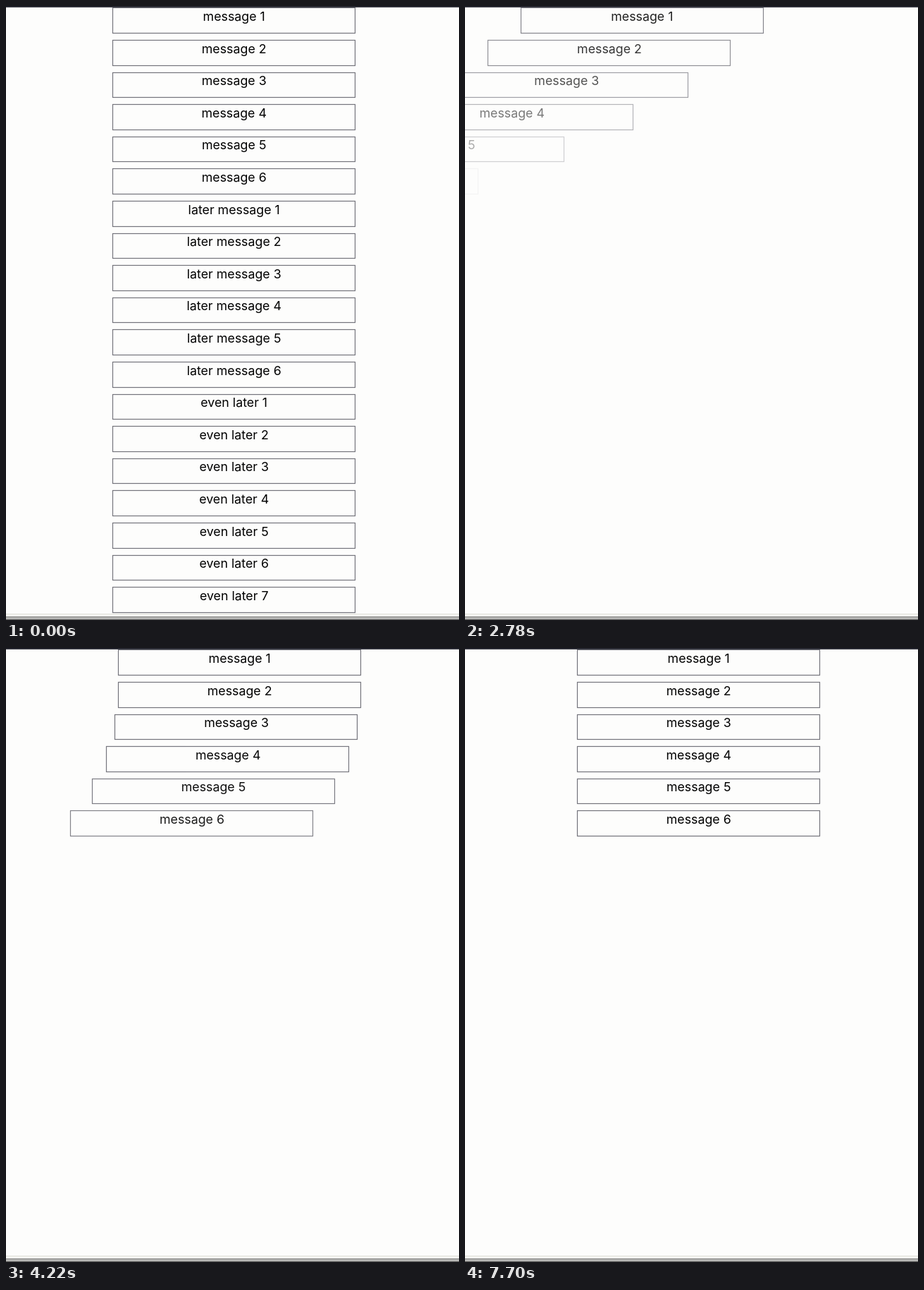
These frames come from a looping animation (643 by 870 pixels, 8000 ms). An HTML page:

```html
<!DOCTYPE html>
<html lang="en">
<head>
<meta charset="utf-8">
<title>Staggered messages</title>
<style>
  html, body { margin: 0; width: 100%; height: 100%; overflow: hidden; background: #fdfdfc; }
  svg { display: block; width: 643px; height: 870px; }
  text { font: 17.8px Inter, "Open Sans", sans-serif; text-anchor: middle; fill: #000; }
  .box { fill: none; stroke: #74747c; stroke-width: 1.2; }
</style>
</head>
<body>
<svg viewBox="0 0 643 870">
  <rect width="643" height="870" fill="#fdfdfc"/>
  <g id="list"></g>
  <rect width="643" height="2" fill="#2b2c35"/>
  <rect y="861" width="643" height="1" fill="#e2e2dc"/>
  <rect y="862" width="643" height="3" fill="#f5f5f0"/>
  <rect y="865" width="643" height="1" fill="#808080"/>
  <rect y="866" width="643" height="3" fill="#b6b6b4"/>
  <rect y="869" width="643" height="1" fill="#565656"/>
</svg>
<script>
const LOOP = 8000;
const CLEAR_AT = 20;     // the full list vanishes
const TRAVEL = 515;      // distance a message slides in from the left
const DURATION = 58;     // slide length, in ticks
const STAGGER = 6;       // ticks between messages
const FIRST_END = 84;    // tick at which message 1 settles

const list = document.getElementById('list');

function make(tag, attrs, parent) {
  const el = document.createElementNS('http://www.w3.org/2000/svg', tag);
  for (const name in attrs) el.setAttribute(name, attrs[name]);
  return parent.appendChild(el);
}

function labels(prefix, count) {
  return Array.from({ length: count }, (_, i) => prefix + ' ' + (i + 1));
}

const rows = [
  ...labels('message', 6),
  ...labels('later message', 6),
  ...labels('even later', 7)
].map((label, i) => {
  const top = Math.round(2.3 + 45.6 * i) + 0.5;
  const bottom = Math.round(37.9 + 45.6 * i) + 0.5;
  const group = make('g', {}, list);
  const box = make('rect', { class: 'box', y: top, width: 344, height: bottom - top }, group);
  const text = make('text', { y: 20.9 + 45.6 * i }, group);
  text.textContent = label;
  return { group, box, text };
});

// Playback advances in ticks lasting 20, 20 and 100 ms.
function tickAt(t) {
  const cycle = Math.floor((t - 120) / 140);
  const rest = t - 120 - cycle * 140;
  return cycle * 3 + (rest < 20 ? 0 : rest < 40 ? 1 : 2);
}

// Distance still to go with r ticks left: a decelerating slide.
function distance(r) {
  return r * r * (0.088 + 0.00075 * r + 1e-7 * r * r * r);
}

function place(row, left, opacity) {
  row.group.setAttribute('opacity', opacity);
  row.box.setAttribute('x', Math.round(left) - 0.5);
  row.text.setAttribute('x', left + 171.7);
}

function draw(t) {
  const full = t < CLEAR_AT;
  const tick = tickAt(t);
  rows.forEach((row, i) => {
    const left = Math.max(0, FIRST_END + STAGGER * i - tick);
    const shown = full || (i < 6 && left <= DURATION);
    row.group.style.display = shown ? '' : 'none';
    if (!shown) return;
    if (full) return place(row, 152, 1);
    const d = distance(left);
    place(row, 160 - d, 1 - Math.pow(Math.min(1, d / TRAVEL), 1.1));
  });
}

const start = performance.now();
function loop(now) {
  draw(Math.max(0, now - start) % LOOP);
  requestAnimationFrame(loop);
}
draw(0);
requestAnimationFrame(loop);
</script>
</body>
</html>
```
